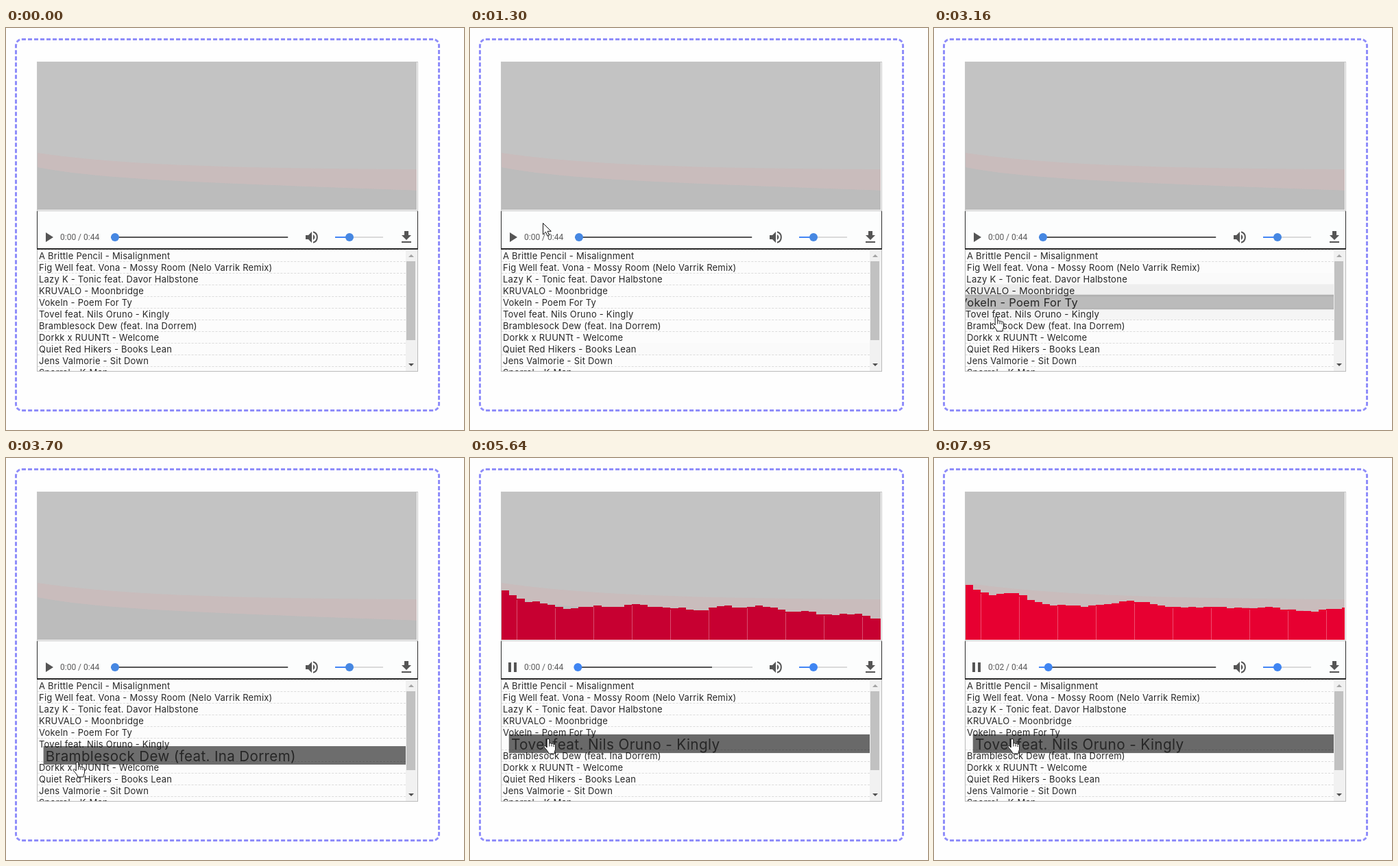
An HTML page with a canvas that plays this animation: 668 px wide and 586 px high, repeating every 8 s.

```html
<!DOCTYPE html>
<html lang="en">
<head>
<meta charset="utf-8">
<title>Playlist player</title>
<style>
  html, body { margin: 0; width: 100%; height: 100%; overflow: hidden; background: #fefefe; }
  #stage { position: relative; width: 100%; height: 100%; overflow: hidden; contain: strict; }
  #stage > * { position: absolute; box-sizing: border-box; }
  #frame { left: 13px; top: 15px; width: 620px; height: 544px; border: 3px dashed #8f8dfa; border-radius: 10px; }
  #scope { left: 45px; top: 49px; width: 556px; height: 218px; border: 1px solid #c6c6c6; background: #fff; }
  #bars { left: 46px; top: 50px; }
  #player { left: 45px; top: 267px; width: 556px; height: 56px; background: #fcfdfd;
    border: solid #2b2b2b; border-width: 0 1px 2px; }
  #ui { left: 0; top: 0; width: 100%; height: 100%; }
  #ui text { font: 12px Roboto, Arial, sans-serif; fill: #5a5a5a; }
  .icon { fill: #555; }
  .line { stroke: #dadada; stroke-width: 2; }
  #list { left: 45px; top: 323px; width: 556px; height: 178px; border: 1px solid #bbb; border-top: 0; background: #fcfcfc; }
  #rows { left: 46px; top: 323px; width: 537px; height: 177px; overflow: hidden; margin: 0; padding: 0; list-style: none;
    font: 400 13px/16px Inter, "Open Sans", sans-serif; letter-spacing: .22px; color: #262626; }
  #rows li { box-sizing: border-box; height: 17px; padding-left: 2px; white-space: nowrap; border-top: 1px dashed #dcdcdc; }
  #scroll { left: 583px; top: 323px; width: 17px; height: 177px; background: #f1f1f1; }
  #scroll i { position: absolute; left: 1px; top: 17px; width: 13px; height: 115px; background: #c1c1c1; }
  #scroll b { position: absolute; left: 4px; border: 4px solid transparent; }
  #scroll .up { top: 3px; border-bottom-color: #a3a3a3; }
  #scroll .down { bottom: 3px; border-top-color: #505050; }
  #cursor { left: 0; top: 0; overflow: visible; width: 20px; height: 26px; }
  #cursor path { fill: #fff; stroke: #111; stroke-linejoin: round; }
</style>
</head>
<body>
<div id="stage">
  <div id="frame"></div>
  <div id="scope"></div>
  <canvas id="bars" width="553" height="215"></canvas>
  <div id="player"></div>
  <svg id="ui">
    <path id="play" class="icon" d="M58 298v14l11-7z"/>
    <path id="pause" class="icon" d="M56 298h4v14h-4zM64 298h4v14h-4z"/>
    <text id="clock" x="79" y="309">0:00 / 0:44</text>
    <path class="line" d="M153 305H412"/>
    <path id="buffer" class="line" style="stroke:#555"/>
    <path id="played" class="line" style="stroke:#4285f4"/>
    <circle id="knob" cy="305" r="6"/>
    <path class="icon" d="M437 302v6h4l5 5v-16l-5 5zM448 301a4.5 4.5 0 0 1 0 8z"/>
    <path d="M448 297.3a8 8 0 0 1 0 15.4" fill="none" stroke="#555" stroke-width="2"/>
    <path class="line" d="M501 305h49"/>
    <path class="line" d="M480 305h21" style="stroke:#4285f4"/>
    <circle id="volKnob" cx="501" cy="305" r="6"/>
    <path class="icon" d="M581 296h6v6h4l-7 7-7-7h4zM577 311h14v2h-14z"/>
  </svg>
  <div id="list"></div>
  <ul id="rows">
    <li>A Brittle Pencil - Misalignment</li>
    <li>Fig Well feat. Vona - Mossy Room (Nelo Varrik Remix)</li>
    <li>Lazy K - Tonic feat. Davor Halbstone</li>
    <li>KRUVALO - Moonbridge</li>
    <li>Vokeln - Poem For Ty</li>
    <li>Tovel feat. Nils Oruno - Kingly</li>
    <li>Bramblesock Dew (feat. Ina Dorrem)</li>
    <li>Dorkk x RUUNTt - Welcome</li>
    <li>Quiet Red Hikers - Books Lean</li>
    <li>Jens Valmorie - Sit Down</li>
    <li>Sparrel - K-Man</li>
  </ul>
  <div id="scroll"><b class="up"></b><i></i><b class="down"></b></div>
  <svg id="cursor">
    <path id="arrow" d="M.5.5V17l4-3.7 2.5 6 2.6-1.1-2.5-5.9h5.2z"/>
    <path id="hand" transform="translate(-6.8 -1)" d="M5 14V3a1.8 1.8 0 0 1 3.6 0v5.5a1.7 1.7 0 0 1 3.2.6 1.6 1.6 0 0 1 3 .7 1.5 1.5 0 0 1 2.6 1V16c0 2-1.5 3.5-1.5 7H7.5C7 20 4.5 17.5 1.2 13.8.2 12 2 10.8 3.3 12zM8.6 8.5v4M11.8 9.5v3M14.8 10.5v2.5"/>
  </svg>
</div>
<script>
const LOOP = 8000, STEP = 77, START = 5320, FADE = 500, BAR = 11.2, W = 553, H = 215;
const $ = id => document.getElementById(id);
const rows = [...document.querySelectorAll('#rows li')];
const ctx = $('bars').getContext('2d');
const lerp = (a, b, k) => a + (b - a) * k;
const clamp = k => Math.max(0, Math.min(1, k));

// time, x, y of the pointer tip
const path = [
  [0, 575, 592], [480, 480, 485], [860, 290, 467], [1300, 106, 284], [1450, 94, 273], [1690, 82, 300],
  [2100, 74, 352], [2540, 75, 372], [3160, 91, 420], [3780, 106, 446], [4010, 106, 446],
  [4390, 113, 421], [4710, 113, 411], [5000, 114, 409], [LOOP, 114, 409]
];
// time, row under the pointer from then on (-1 for none)
const hovers = [
  [480, 8], [880, -1], [1810, 0], [1880, 1], [2495, 2], [2790, 3], [2980, 4], [3130, 5], [3310, 6], [4610, 5], [2 * LOOP, -1]
];

// the CSS "ease" curve
function ease(x) {
  if (x <= 0) return 0;
  if (x >= 1) return 1;
  let lo = 0, hi = 1, s;
  for (let i = 0; i < 20; i++) {
    s = (lo + hi) / 2;
    if (.75 * s * (1 - s) + s ** 3 < x) lo = s; else hi = s;
  }
  return .3 * (1 - s) ** 2 * s + 3 * (1 - s) * s * s + s ** 3;
}

function hoverLevel(t, enter, leave) {
  if (t < leave) return ease((t - enter) / FADE);
  const full = ease((leave - enter) / FADE);
  return full * (1 - ease((t - leave) / (FADE * full)));
}

function drawRows(t) {
  const level = rows.map(() => 0);
  hovers.forEach(([enter, i], k) => {
    if (i >= 0) level[i] = Math.max(level[i], hoverLevel(t, enter, hovers[k + 1][0]));
  });
  rows.forEach((row, i) => {
    const p = level[i], on = p > .002;
    row.style.transform = on ? `scale(${1 + .6 * p}) translateX(${20 * p}%)` : 'none';
    row.style.background = on ? `rgba(0,0,0,${.58 * p})` : 'none';
    row.style.borderTopColor = on ? 'transparent' : '';
  });
}

function drawCursor(t) {
  const i = path.findIndex(p => p[0] > t), a = path[i - 1], b = path[i];
  const k = (t - a[0]) / (b[0] - a[0]);
  const x = lerp(a[1], b[1], k), y = lerp(a[2], b[2], k);
  const hand = y > 323 && y < 500 && x < 583;
  $('cursor').style.transform = `translate(${Math.round(x)}px,${Math.round(y)}px)`;
  $('hand').style.display = hand ? '' : 'none';
  $('arrow').style.display = hand ? 'none' : '';
}

const bump = (i, at, size, width) => size * Math.exp(-(((i - at) / width) ** 2));
const early = i => 166 - 22 * Math.exp(-i / 4.5) - bump(i, 20, 4, 2) + Math.max(0, i - 36) * 1.25;
const late = i => 168 - 33 * Math.exp(-i / 5) - bump(i, 6, 12, 2) - bump(i, 21, 10, 3) + bump(i, 44, 6, 3);

// top edge of bar i at picture step n: rise, then drift from one spectrum to the other
function barTop(i, n) {
  const u = (n - 86) / 17;
  const shake = u < 0 ? Math.min(1, -u * 4) : Math.sin(Math.PI * clamp(u));
  const wave = 2.5 * Math.sin(n * 1.7 + i * .4) + 2 * Math.sin(n * 2.9 - i * 1.1);
  const top = lerp(early(i), late(i), clamp(u)) + shake * (wave + 3) + Math.sin(i * i * 2.3);
  return Math.round(lerp(H, top, clamp((n - 68) / 5)));
}

function fillBars(n, color, alpha) {
  ctx.globalAlpha = alpha;
  ctx.fillStyle = color;
  for (let i = 0; i * BAR < W; i++) {
    const x = Math.round(i * BAR), y = barTop(i, n);
    ctx.fillRect(x, y, Math.round((i + 1) * BAR) - x, H - y);
  }
  ctx.globalAlpha = 1;
}

function fillUnder(curve, color) {
  ctx.fillStyle = color;
  ctx.beginPath();
  ctx.moveTo(0, H);
  for (let x = 0; x <= W; x += 7) ctx.lineTo(x, curve(x));
  ctx.lineTo(W, H);
  ctx.fill();
}

function drawScope(t) {
  ctx.fillStyle = '#c3c3c3';
  ctx.fillRect(0, 0, W, H);
  fillUnder(x => 157 - 25 * Math.exp(-x / 170), '#c9bcbc');
  fillUnder(x => 167 - 14 * Math.exp(-x / 90) + x * .036, '#bcbcbc');
  if (t < START) return;
  const n = Math.floor(t / STEP);
  const color = `rgb(${Math.round(lerp(199, 231, clamp((t - 6640) / 1310)))},0,49)`;
  for (let k = 5; k; k--) if (n - k > 68) fillBars(n - k, color, .3 - .05 * k);
  fillBars(n, color, 1);
  ctx.fillStyle = 'rgba(255,255,255,.3)';
  for (let i = 2; i * BAR < W; i += 5) {
    const y = barTop(i, n) + 2;
    ctx.fillRect(Math.round(i * BAR), y, 1, H - y);
  }
}

function drawPlayer(t) {
  const on = t >= START;
  const sec = Math.max(0, (t - 5720) / 1000);
  const x = on ? 153 + Math.max(.7, sec) * 6.2 : 159;
  $('play').style.display = on ? 'none' : '';
  $('pause').style.display = on ? '' : 'none';
  $('clock').textContent = `0:0${Math.floor(sec)} / 0:44`;
  $('buffer').setAttribute('d', `M153 305H${on && t < 7030 ? 353 : 411}`);
  $('played').setAttribute('d', on ? `M153 305H${x}` : '');
  $('knob').setAttribute('cx', x);
  for (const id of ['knob', 'volKnob']) $(id).setAttribute('fill', on ? '#3f85f2' : '#4687e2');
}

function tick() {
  const t = performance.now() % LOOP;
  drawScope(t);
  drawPlayer(t);
  drawRows(t);
  drawCursor(t);
  requestAnimationFrame(tick);
}
tick();
</script>
</body>
</html>
```
